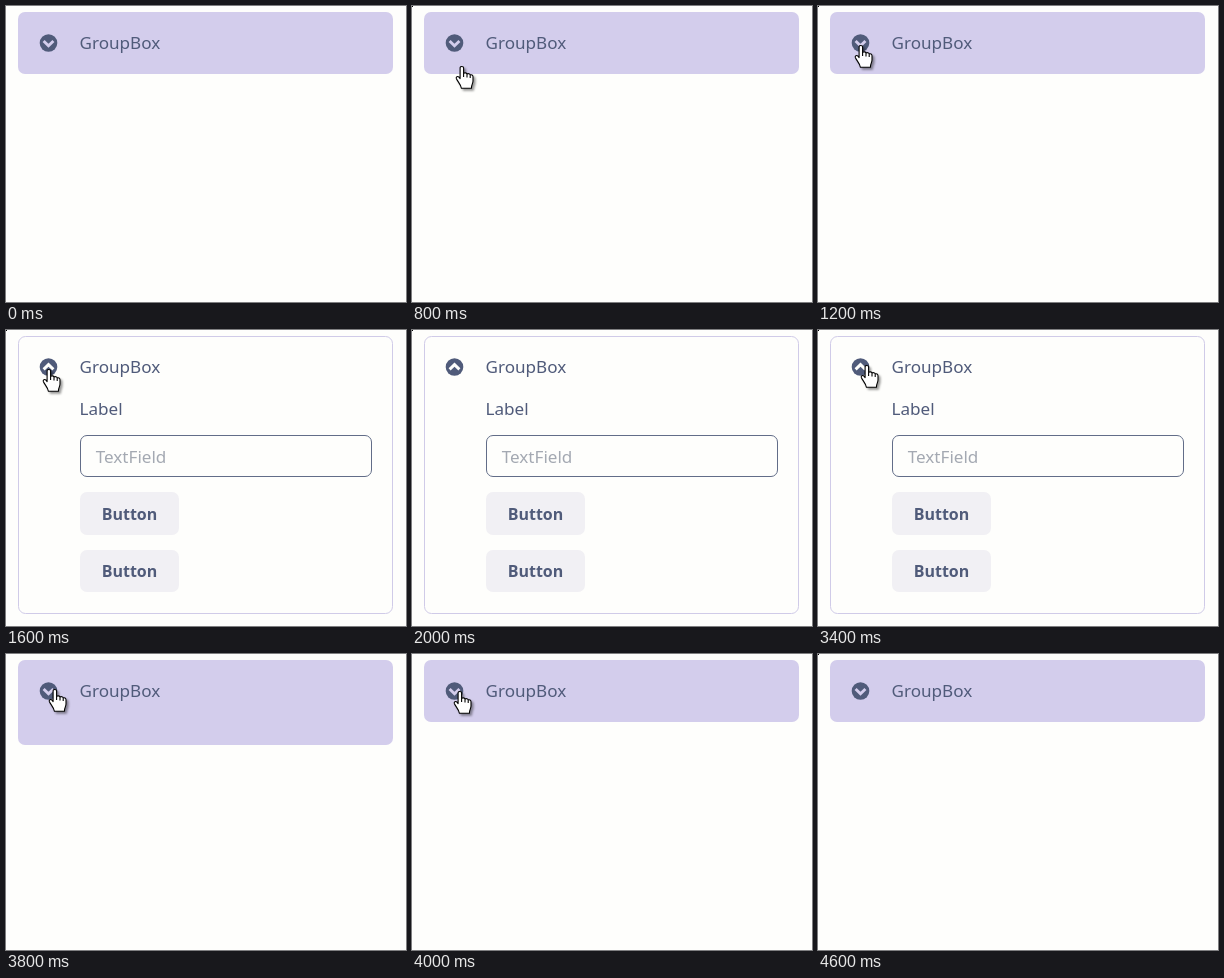
An HTML page that plays this animation: 400 px wide and 296 px high, repeating every 5.2 s.

```html
<!DOCTYPE html>
<html lang="en">
<head>
<meta charset="utf-8">
<title>GroupBox</title>
<style>
  html, body { margin: 0; width: 100%; height: 100%; overflow: hidden; background: #fefefc; }
  svg { display: block; }
  text { font: 17.1px "Noto Sans", "Open Sans", sans-serif; fill: #505b7a; }
  .hint { fill: #a4a9b2; }
  .button rect { fill: #f1f0f4; }
  .button text { font-size: 16px; font-weight: 600; text-anchor: middle; }
  .cursor { fill: #fff; stroke: #000; stroke-width: 1.1; stroke-linejoin: round;
            filter: drop-shadow(2px 2px 1px rgba(0, 0, 0, .4)); }
</style>
</head>
<body>
<svg width="400" height="296" viewBox="0 0 400 296">
  <rect id="panel" x="12" y="6" width="375" height="62" rx="7"/>
  <circle cx="42.5" cy="37" r="8.8" fill="#505b7a"/>
  <path id="chevron" fill="none" stroke-width="2.9"/>
  <text x="73.5" y="43.4">GroupBox</text>
  <g id="content">
    <text x="73.5" y="84.5">Label</text>
    <rect x="74.5" y="105.5" width="291" height="41" rx="6.5" fill="none" stroke="#626d88"/>
    <text class="hint" x="89.7" y="132.6">TextField</text>
    <g class="button">
      <rect x="74" y="162" width="99" height="43" rx="7"/>
      <text x="123.5" y="190">Button</text>
    </g>
    <g class="button">
      <rect x="74" y="220" width="99" height="42" rx="7"/>
      <text x="123.5" y="246.7">Button</text>
    </g>
  </g>
  <path id="arrow" class="cursor" d="M0 0V16.5L4 12.8 6.6 18.8 9 17.8 6.4 12H11.5Z"/>
  <path id="hand" class="cursor" d="M-1.9 1.8C-1.9 0 1.6 0 1.6 1.8V7.4C2.6 6.5 4.6 6.7 5 8C6 7.3 7.8 7.6 8.2 8.9C9.4 8.4 11 9 11 10.8V15C11 17.5 9.4 18.5 9.4 22.3H-.6C-.8 19 -4 16 -5.6 12.8C-6.4 11 -4.4 9.6 -3 11.2L-1.9 12.6ZM1.6 7.4V11M5 8V11.4M8.2 9V12"/>
  <rect id="dot" width="1" height="1"/>
</svg>
<script>
const LOOP = 5200;
const OPEN = 278, CLOSED = 62, CLOSING = 85;

// start time, panel height, corner dot, cursor shape, cursor x, cursor y
const STEPS = [
  [0, CLOSED, 0],
  [400, CLOSED, 1],
  [600, CLOSED, 1, "arrow", 39, 96],
  [800, CLOSED, 1, "hand", 50, 60],
  [1000, CLOSED, 1, "hand", 45, 35],
  [1200, CLOSED, 1, "hand", 43, 39],
  [1600, OPEN, 1, "hand", 43, 39],
  [1800, OPEN, 1, "hand", 25, 46],
  [2000, OPEN, 1],
  [3000, OPEN, 1, "arrow", -7, 36],
  [3200, OPEN, 1, "hand", 43, 33],
  [3400, OPEN, 1, "hand", 49, 35],
  [3800, CLOSING, 0, "hand", 49, 35],
  [4000, CLOSED, 0, "hand", 48, 37],
  [4200, CLOSED, 0, "arrow", -2, 68],
  [4400, CLOSED, 0],
  [4600, CLOSED, 1]
];

const el = id => document.getElementById(id);
const show = (id, on) => el(id).setAttribute("visibility", on ? "visible" : "hidden");
const set = (id, attrs) => {
  for (const key in attrs) el(id).setAttribute(key, attrs[key]);
};

function render([, height, dot, cursor, x, y]) {
  const open = height === OPEN;
  const inset = open ? 0.5 : 0;
  set("panel", {
    x: 12 + inset, y: 6 + inset, width: 375 - 2 * inset, height: height - 2 * inset,
    fill: open ? "#fefefc" : "#d3cdec", stroke: open ? "#d0cbe8" : "none"
  });
  set("chevron", {
    d: open ? "M37.6 39.4L42.5 34.6L47.4 39.4" : "M37.6 35L42.5 39.8L47.4 35",
    stroke: open ? "#fefefc" : "#d3cdec"
  });
  show("content", open);
  show("dot", dot);
  for (const id of ["arrow", "hand"]) {
    show(id, cursor === id);
    if (cursor === id) set(id, { transform: `translate(${x} ${y})` });
  }
}

const start = performance.now();
let current;
function tick() {
  const t = (performance.now() - start) % LOOP;
  const step = STEPS.findLast(s => s[0] <= t) || STEPS[0];
  if (step !== current) render(current = step);
  requestAnimationFrame(tick);
}
tick();
</script>
</body>
</html>
```
